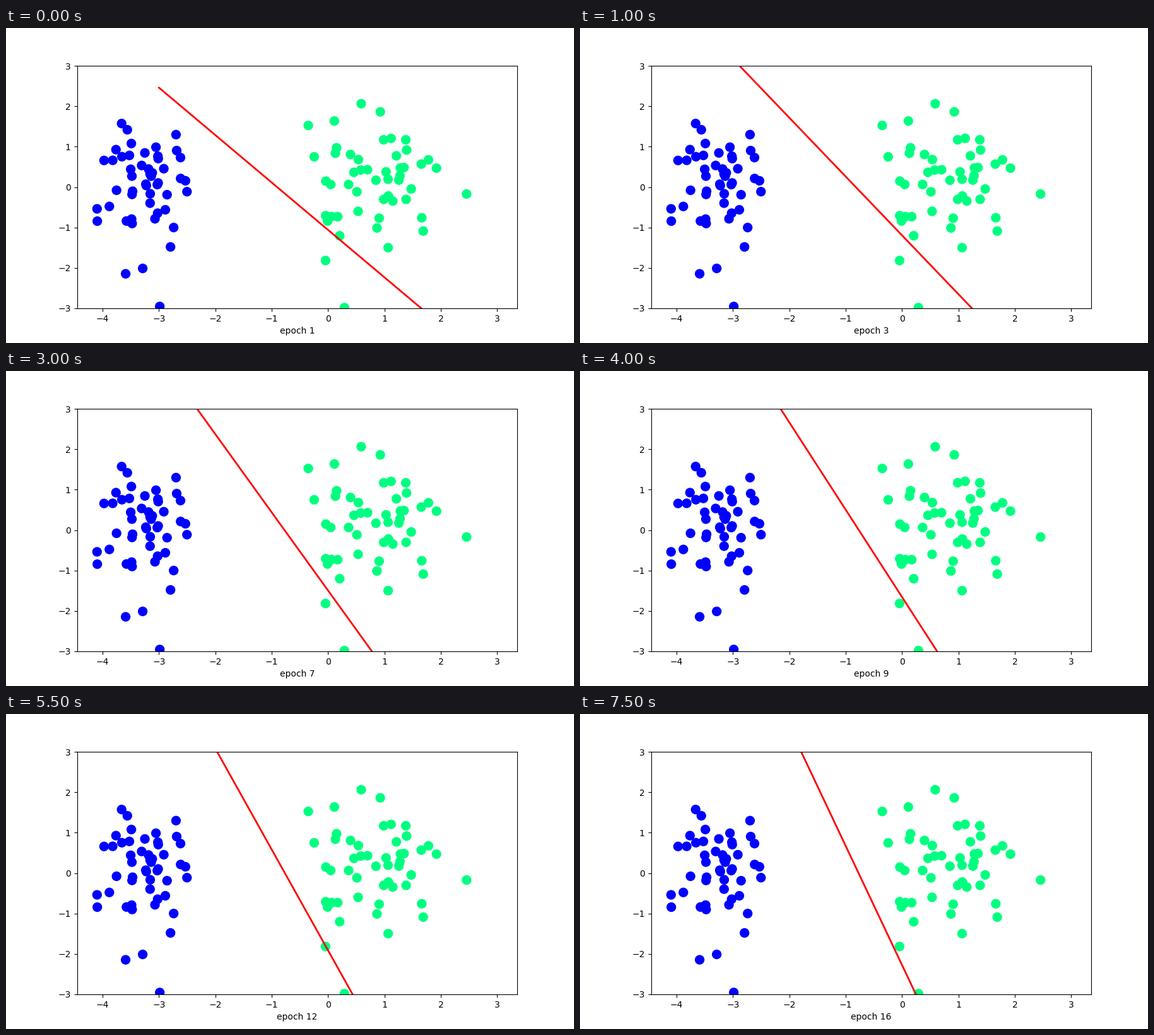
These frames come from a looping animation (900 px wide and 500 px high, 8 s). A matplotlib script:

```python
import numpy as np
import matplotlib.pyplot as plt
from matplotlib.animation import FuncAnimation

EPOCHS = 16
PER_CLASS = 50
CLASS_SEP = 20
RATE = 0.5


def make_clusters(seed):
    """Two classes apart along x, with plain normal noise along y."""
    rng = np.random.RandomState(seed)
    centers = np.array([-CLASS_SEP, CLASS_SEP]) * rng.uniform(size=2)
    centers *= rng.uniform()
    x = rng.standard_normal((2, PER_CLASS))
    for k, center in enumerate(centers):
        x[k] = x[k] * (2 * rng.uniform() - 1) + center
    y = rng.standard_normal(2 * PER_CLASS)
    return x.ravel(), y, np.repeat([0, 1], PER_CLASS)


def descend(x, y, labels):
    """Logistic regression; slope and bias of the boundary after each epoch."""
    inputs = np.column_stack([np.ones_like(x), x, y])
    weights = np.ones(3)
    lines = []
    for _ in range(EPOCHS):
        guess = 1 / (1 + np.exp(-inputs @ weights))
        weights = weights + RATE * (labels - guess) @ inputs / len(labels)
        lines.append((-weights[1] / weights[2], -weights[0] / weights[2]))
    return lines


x, y, labels = make_clusters(41)
lines = descend(x, y, labels)

fig, ax = plt.subplots(figsize=(9, 5), dpi=100)
ax.scatter(x, y, c=labels, cmap="winter", s=100)
ends = np.array([-3, 3])
boundary, = ax.plot(ends, ends, "r-", linewidth=2)
ax.set(xlim=(-4.455, 3.355), ylim=(-3, 3))


def update(i):
    slope, bias = lines[i]
    boundary.set_ydata(slope * ends + bias)
    ax.set_xlabel(f"epoch {i + 1}")
    return boundary, ax.xaxis.label


update(0)
anim = FuncAnimation(fig, update, frames=EPOCHS, interval=500, repeat=True,
                     repeat_delay=0, blit=False)
plt.show()
```
